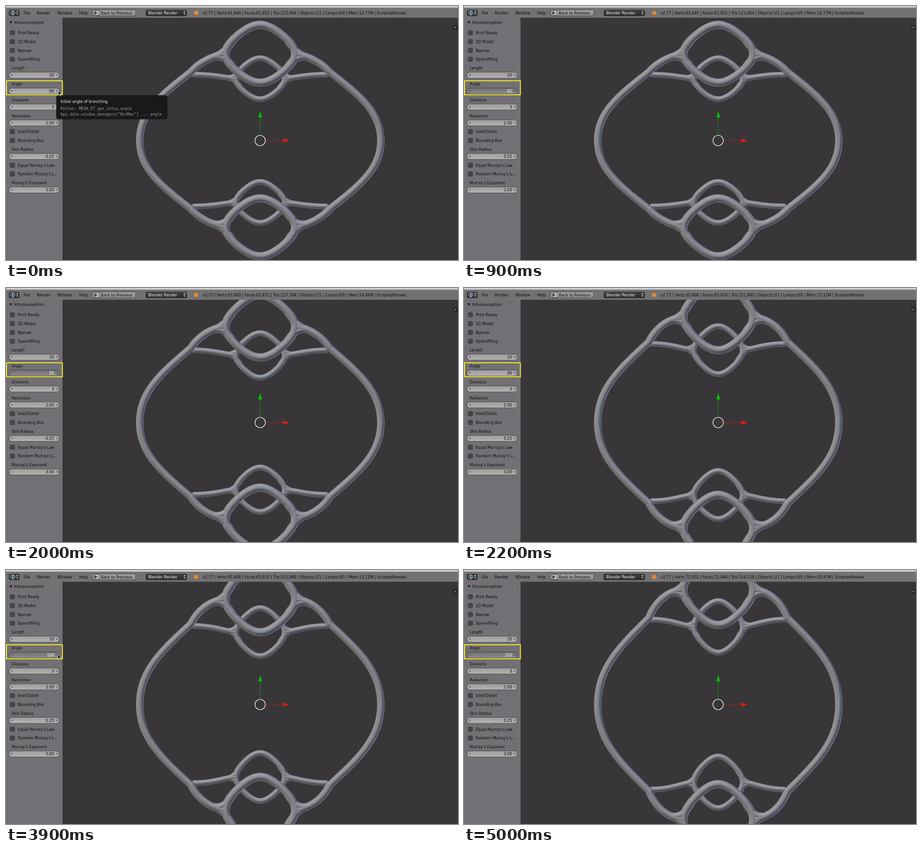
Animation of 960 by 540 pixels, one loop 5100 ms. Source, as an HTML page with a canvas:

```html
<!DOCTYPE html>
<html lang="en">
<head>
<meta charset="utf-8">
<title>Branching angle</title>
<style>
html, body { margin: 0; width: 100%; height: 100%; overflow: hidden; background: #393639; }
canvas, svg { position: absolute; left: 0; top: 0; width: 960px; height: 540px; }
text { font: 8px "DejaVu Sans", sans-serif; fill: #0c0c0c; white-space: pre; }
.title { font-size: 8.7px; }
.light { fill: #f2f2f2; }
.mono { font: 8.1px "DejaVu Sans Mono", monospace; fill: #9c9c9c; }
</style>
</head>
<body>
<canvas id="view" width="960" height="540"></canvas>
<svg id="ui" viewBox="0 0 960 540"></svg>
<script>
const LOOP = 5100;

/* ---------- interface ---------- */
const ui = document.getElementById("ui");
const rect = (x, y, w, h, fill, more = "") =>
  `<rect x="${x}" y="${y}" width="${w}" height="${h}" fill="${fill}" ${more}/>`;
const text = (x, y, s, more = "") => `<text x="${x}" y="${y}" ${more}>${s}</text>`;
const shape = (d, fill, more = "") => `<path d="${d}" fill="${fill}" ${more}/>`;
const gradient = (id, a, b) =>
  `<linearGradient id="${id}" x2="0" y2="1"><stop stop-color="${a}"/><stop offset="1" stop-color="${b}"/></linearGradient>`;
const edge = 'stroke="#2e2d2f" stroke-width=".7"';

function check(y, label) {
  return rect(8.7, y - 4.8, 9.6, 9.6, "#474648", `rx="2" ${edge}`) + text(25, y + 3.2, label);
}
function field(y, label, value) {
  const id = label.toLowerCase();
  return text(12, y - 11.8, label) +
    rect(6.5, y - 6.4, 106.5, 12.8, "url(#num)", `rx="6" ${edge} id="${id}-box"`) +
    shape(`M13.4 ${y - 2.2}l-2.6 2.2 2.6 2.2zM107 ${y - 2.2}l2.6 2.2-2.6 2.2z`, "#4c4c4c") +
    text(102, y + 3.2, value, `text-anchor="end" id="${id}"`);
}
const arrows = x =>
  shape(`M${x - 2.2} 13.2l2.2-3 2.2 3zM${x - 2.2} 15.8l2.2 3 2.2-3z`, "#cfcfcf");

// a value makes a number field, none makes a check box
function panel(rows) {
  let y = 38.2;
  return rows.map(([label, value]) => {
    y += value ? 33.8 : 18.75;
    return value ? field(y, label, value) : check(y, label);
  }).join("");
}

ui.innerHTML =
  `<defs>${gradient("num", "#9d9d9d", "#b3b3b3")}${gradient("down", "#707070", "#8e8e8e")}
   ${gradient("menu", "#414141", "#292929")}${gradient("btn", "#a2a2a2", "#8e8e8e")}</defs>` +
  // axes
  `<path d="M540 275V237" stroke="#0a9b0a"/>` + shape("M540 223l4 14h-8z", "#00c000") +
  `<path d="M552 286H589" stroke="#b51a10"/>` + shape("M602.5 286l-14 4v-8z", "#e61c0c") +
  `<circle cx="539.8" cy="286" r="11" fill="none" stroke="#fff" stroke-width="1.2"/>` +
  rect(949.5, 40.5, 10.5, 10, "#29272a", 'rx="3"') +
  `<path d="M952 45.5h4.4M954.2 43.3v4.4" stroke="#8d8d8d"/>` +
  // header
  rect(0, 0, 960, 25, "#727173") + rect(0, 0, 960, 3.5, "#cfcfcf") +
  rect(6.5, 8.5, 22, 12.5, "url(#menu)", `rx="3" ${edge}`) +
  `<circle cx="14.5" cy="14.7" r="4.4" fill="#26415f" stroke="#d5dfea"/>` +
  shape("M13.8 11.6h1.6v1.5h-1.6zM13.8 13.8h1.6v4h-1.6z", "#fff") + arrows(24) +
  text(37.5, 17.8, "File") + text(65.5, 17.8, "Render") + text(109, 17.8, "Window") + text(155.5, 17.8, "Help") +
  rect(184, 8.3, 91.5, 12.8, "url(#btn)", `rx="3" ${edge}`) +
  rect(189, 10.3, 8.5, 8.8, "#d8d8d8", 'stroke="#333" stroke-width=".8"') +
  shape("M187.4 14.7l3.4-3v2h4v2h-4v2z", "#222") + text(201.5, 17.8, "Back to Previous") +
  rect(297, 8.3, 87, 12.8, "url(#menu)", `rx="3" ${edge}`) +
  text(302, 17.8, "Blender Render", 'class="light"') + arrows(379) +
  `<circle cx="404" cy="14.8" r="4.6" fill="#e58a2c"/>` + text(417.5, 17.8, "", 'id="stats"') +
  // side panel
  rect(0, 25, 120, 515, "#727074") +
  shape("M7.2 32.8h6.2l-3.1 5z", "#111") + text(17, 38.4, "Intussuception", 'class="title"') +
  `<path d="M106 34.5h6M106 36.8h6" stroke="#929194" stroke-dasharray="1 1"/>` +
  panel([["Print Ready"], ["2D Model"], ["Narrow"], ["Spacefilling"],
    ["Length", "20"], ["Angle", "90"], ["Divisions", "3"], ["Reduction", "2.00"],
    ["Inlet/Outlet"], ["Bounding Box"], ["Skin Radius", "0.25"],
    ["Equal Murray's Law"], ["Random Murray's L..."], ["Murray's Exponent", "3.00"]]) +
  rect(1, 159, 118.8, 29.7, "none", 'stroke="#f2e921" stroke-width="2"') +
  `<g id="tip">` + rect(107, 190, 235.5, 50.5, "#19181a", 'rx="4" stroke="#111" stroke-opacity=".6"') +
  text(116, 205.8, "Initial angle of branching", 'class="light"') +
  text(116, 221.2, "Python: MESH_OT_gen_intus.angle", 'class="mono"') +
  text(116, 233, 'bpy.data.window_managers["WinMan"] ... angle', 'class="mono"') + `</g>` +
  shape("M0 0V9.6L2.2 7.6 3.9 11.3 5.7 10.5 4 6.9H7z", "#0a0a0a", 'id="cursor" stroke="#fff" stroke-width=".8"');

const [stats, num, box, tip, cursor] =
  ["stats", "angle", "angle-box", "tip", "cursor"].map(id => document.getElementById(id));

/* ---------- vessel mesh ---------- */
const SCALE = 2, W = 960 * SCALE, H = 540 * SCALE;
const CX = 539.7, CY = 285.7;
const BACK = -40;

const unit = v => v.map(c => c / Math.hypot(...v));
const lights = [
  { dir: unit([-.892, .3, .9]), rgb: [.8, .8, .8] },
  { dir: unit([.588, .46, .248]), rgb: [.498, .5, .6] },
  { dir: unit([.216, -.392, -.216]), rgb: [.798, .838, 1] }
];
const GAIN = 255 * .8 * .9;

function bezier(pts) {
  return t => {
    let p = pts;
    while (p.length > 1)
      p = p.slice(1).map((b, i) => [p[i][0] + (b[0] - p[i][0]) * t, p[i][1] + (b[1] - p[i][1]) * t]);
    return p[0];
  };
}

// right half of a rounded diamond, t from top to bottom
function diamond(half, top, bottom) {
  const k = .05, mid = (top + bottom) / 2, h = (bottom - top) / 2;
  return t => {
    const a = Math.PI * t;
    return [half * (Math.sin(a) - k * Math.sin(3 * a)) / (1 + k),
      mid - h * (Math.cos(a) + k * Math.cos(3 * a)) / (1 + k)];
  };
}

// curves of the upper right quarter, measured from the middle
function vessels(stage) {
  const grow = 1 + .088 * stage;
  const loop = diamond(74, -246 - 24.5 * stage, -123 - 15.4 * stage);
  const inner = diamond(52, -175 - 15 * stage, -88 - 7.5 * stage);
  const joint = [147, -146 * grow], fork = loop(.5), knot = inner(.5);
  const side = bezier([[256, 0], [256, -62 * grow], [208, -98 * grow], joint]);
  const branch = bezier([joint, [133, -162 - 19 * stage], [108, -178 - 21 * stage], fork]);
  const twig = bezier([[140, -140 - 13.5 * stage], [100, -140 - 13.5 * stage], [75, knot[1] - 2], knot]);
  const web = (stem, s, hub, ring, t) => bezier([stem(s), hub, ring(t)]);
  return [
    [loop, 8.8, 0], [side, 7.9, 0], [branch, 8.2, 0],
    [web(branch, .7, fork, loop, .3), 8, 0], [web(branch, .7, fork, loop, .7), 8, 0],
    [inner, 6.1, BACK], [twig, 6, BACK],
    [web(twig, .72, knot, inner, .3), 5.6, BACK], [web(twig, .72, knot, inner, .7), 5.6, BACK]
  ];
}

// sweep spheres along the curves into a height map, then light its normals
function sculpt(stage) {
  const height = new Float32Array(W * H).fill(-1e3);
  const nx = new Float32Array(W * H), ny = new Float32Array(W * H);

  function ball(cx, cy, r, depth) {
    const x1 = Math.min(W - 1, cx + r), y1 = Math.min(H - 1, cy + r);
    for (let y = Math.max(0, Math.ceil(cy - r)); y <= y1; y++)
      for (let x = Math.max(0, Math.ceil(cx - r)); x <= x1; x++) {
        const dx = x - cx, dy = y - cy, q = r * r - dx * dx - dy * dy;
        if (q < 0) continue;
        const z = depth + Math.sqrt(q), i = y * W + x;
        if (z > height[i]) {
          height[i] = z;
          nx[i] = dx / r;
          ny[i] = -dy / r;
        }
      }
  }

  const count = 300;
  for (const [curve, r, depth] of vessels(stage))
    for (let i = 0; i <= count; i++) {
      const [x, y] = curve(i / count);
      for (const sx of [1, -1])
        for (const sy of [1, -1])
          ball((CX + sx * x) * SCALE, (CY + sy * y) * SCALE, r * SCALE, depth * SCALE);
    }

  const canvas = document.createElement("canvas");
  canvas.width = W;
  canvas.height = H;
  const c = canvas.getContext("2d"), image = c.createImageData(W, H);
  for (let i = 0; i < W * H; i++) {
    if (height[i] === -1e3) continue;
    const nz = Math.sqrt(Math.max(0, 1 - nx[i] ** 2 - ny[i] ** 2));
    for (const { dir, rgb } of lights) {
      const lit = GAIN * Math.max(0, nx[i] * dir[0] + ny[i] * dir[1] + nz * dir[2]);
      for (let k = 0; k < 3; k++) image.data[i * 4 + k] += lit * rgb[k];
    }
    image.data[i * 4 + 3] = 255;
  }
  c.putImageData(image, 0, 0);
  return canvas;
}

/* ---------- playback ---------- */
const ctx = document.getElementById("view").getContext("2d");
const meshes = [0, 1, 2, 3].map(sculpt);
const sizes = [[61940, "14.77"], [63860, "14.94"], [65908, "15.11"], [72052, "15.67"]];
const group = n => n.toLocaleString("en-US");
let shown = -1;

function setStage(stage) {
  if (stage === shown) return;
  shown = stage;
  ctx.fillStyle = "#393639";
  ctx.fillRect(0, 0, 960, 540);
  ctx.drawImage(meshes[stage], 0, 0, 960, 540);
  const [verts, mem] = sizes[stage], faces = verts + 12;
  stats.textContent = `v2.77 | Verts:${group(verts)} | Faces:${group(faces)} | Tris:${group(faces * 2)}` +
    ` | Objects:1/1 | Lamps:0/0 | Mem:${mem}M | ScriptedVessels`;
}

// times when the mouse button is let go, each adding one degree
const clicks = [900, 1000, 1200, 1600, 1900, 2200, 2500, 2800, 3000, 3600, 4000, 4400, 4800, 5200];

function render(t) {
  const done = clicks.filter(c => c <= t).length;
  const angle = 90 + done;
  const wait = clicks[done] - t, since = t - (clicks[done - 1] ?? -LOOP);
  const pressed = wait <= 200;
  const blink = since < 100 || (pressed && wait > 100);   // pointer drops out on redraw

  setStage(Math.floor((angle - 87) / 4.5));
  num.textContent = angle;
  num.style.fill = pressed ? "#fff" : "";
  box.setAttribute("fill", pressed ? "url(#down)" : "url(#num)");
  tip.style.display = t < 100 ? "" : "none";
  cursor.style.display = blink ? "none" : "";
  cursor.setAttribute("transform", t < 100 ? "translate(111 180)" : "translate(110.2 179.4)");
}

const start = performance.now();
function tick() {
  render((performance.now() - start) % LOOP);
  requestAnimationFrame(tick);
}
tick();
</script>
</body>
</html>
```
